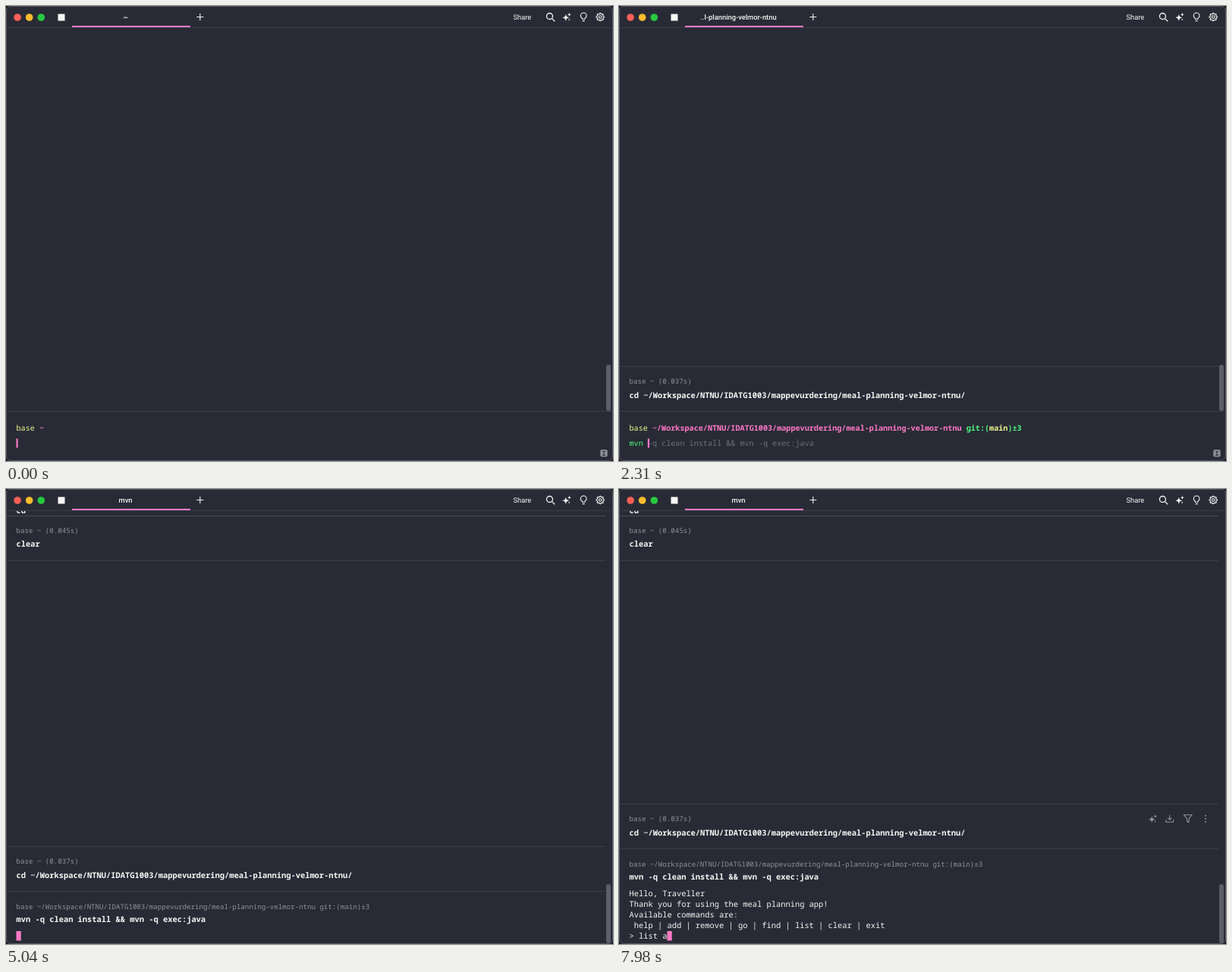
These frames come from a looping animation (800 px wide and 600 px high, 8 s). An HTML page with a canvas:

```html
<!DOCTYPE html>
<html lang="en">
<head>
<meta charset="utf-8">
<title>Terminal session</title>
<style>
  html, body { margin: 0; width: 100%; height: 100%; overflow: hidden; background: #282a36; }
  canvas { display: block; }
</style>
</head>
<body>
<canvas id="stage" width="800" height="600"></canvas>
<script>
const ctx = document.getElementById('stage').getContext('2d');
const LOOP = 8000;
const BG = '#282b36', FG = '#f8f8f4', GREY = '#90929a', DIM = '#6f717b', LINE = '#3d404b';
const PINK = '#ff79c6', YELLOW = '#f1fa8c', GREEN = '#50fa7b', BLUE = '#6fa8fa';
const BLOCK = 10.4, INPUT = 10.14, META = 9.13, LEFT = 13.5;
const FOLDER = '~/Workspace/NTNU/IDATG1003/mappevurdering/meal-planning-velmor-ntnu';
const CD = `cd ${FOLDER}/`;
const MVN = 'mvn -q clean install && mvn -q exec:java';
const OUTPUT = [
  'Hello, Traveller',
  'Thank you for using the meal planning app!',
  'Available commands are:',
  ' help | add | remove | go | find | list | clear | exit'
];

// Each entry is [start time, text typed so far].
const CD_TYPING = [[0, ''], [70, 'c'], [140, 'cd'], [350, 'cd '], [840, CD]];
const MVN_TYPING = [[0, ''], [1820, 'm'], [1960, 'mv'], [2100, 'mvn'], [2310, 'mvn '], [2730, MVN]];
const APP_TYPING = [[0, ''], [7420, 'l'], [7490, 'li'], [7560, 'lis'], [7700, 'list'], [7840, 'list '], [7980, 'list a']];
const at = (steps, t) => steps.filter(s => s[0] <= t).pop()[1];

function rect(x, y, w, h, color) {
  ctx.fillStyle = color;
  ctx.fillRect(x, y, w, h);
}

function box(x, y, w, h, r, color) {
  ctx.fillStyle = color;
  ctx.beginPath();
  ctx.roundRect(x, y, w, h, r);
  ctx.fill();
}

function disc(x, y, r, color) {
  ctx.fillStyle = color;
  ctx.beginPath();
  ctx.arc(x, y, r, 0, 7);
  ctx.fill();
}

function stroke(d, color, width = 1.2) {
  ctx.strokeStyle = color;
  ctx.lineWidth = width;
  ctx.stroke(new Path2D(d));
}

// Terminal text sits on a fixed cell grid; parts are [text, color, weight].
function mono(y, size, ...parts) {
  const cell = size * 0.6;
  let x = LEFT;
  ctx.textAlign = 'left';
  for (const [text, color, weight = 400] of parts) {
    ctx.font = `${weight} ${size}px "Noto Sans Mono", monospace`;
    ctx.fillStyle = color;
    for (const ch of text) {
      ctx.fillText(ch, x, y);
      x += cell;
    }
  }
  return x;
}

function label(text, x, weight, align) {
  ctx.font = `${weight} 9.35px Roboto, sans-serif`;
  ctx.fillStyle = FG;
  ctx.textAlign = align;
  ctx.fillText(text, x, 18);
}

function star(x, y, r, color) {
  ctx.fillStyle = color;
  ctx.beginPath();
  for (let i = 0; i < 8; i++) {
    const a = i * Math.PI / 4, d = i % 2 ? r * 0.38 : r;
    ctx.lineTo(x + d * Math.cos(a), y + d * Math.sin(a));
  }
  ctx.fill();
}

function sparkles(x, y, color) {
  star(x - 1.2, y + 1, 4.4, color);
  star(x + 3.4, y - 3, 2.5, color);
  star(x + 3.2, y + 3.6, 1.5, color);
}

function gear(x, y) {
  ctx.beginPath();
  for (let i = 0; i < 48; i++) {
    const a = i * Math.PI / 24, r = 4.6 + 0.6 * Math.tanh(3 * Math.cos(8 * a));
    ctx.lineTo(x + r * Math.cos(a), y + r * Math.sin(a));
  }
  ctx.closePath();
  ctx.strokeStyle = FG;
  ctx.lineWidth = 1.1;
  ctx.stroke();
  ctx.beginPath();
  ctx.arc(x, y, 1.8, 0, 7);
  ctx.stroke();
}

function header(title) {
  rect(0, 0, 800, 28, BG);
  rect(1, 28, 798, 1, '#3b3e49');
  ['#ff5f57', '#febc2e', '#28c840'].forEach((c, i) => disc(15.1 + 15.6 * i, 15, 4.8, c));
  rect(68.5, 10.5, 9, 9, FG);
  rect(87, 26, 156, 2, PINK);
  label(title, 157.5, 500, 'center');
  label('Share', 668.5, 400, 'left');
  stroke('M251.3 14.5h9M255.8 10v9', FG, 1.1);
  stroke('M720.5 13.5a4 4 0 1 1-8 0a4 4 0 1 1 8 0M719.4 16.4l3.8 3.8', FG, 1.3);
  sparkles(739, 14.3, FG);
  stroke('M759.6 17.2c0-1.6-2.3-2-2.3-4.3a3.9 3.9 0 0 1 7.8 0c0 2.3-2.3 2.7-2.3 4.3zM759.7 19.6h3', FG, 1.1);
  gear(783.2, 14.5);
}

const divider = (y, w = 790) => rect(1, y, w - 1, 1, LINE);
const scrollbar = (y, h) => box(791, y, 6, h, 3, '#5c5e68');

function cdBlock(y, link) {
  divider(y);
  mono(y + 23.3, META, ['base ~ (0.037s)', GREY]);
  mono(y + 41.7, BLOCK, ['cd ', FG, 700], [CD.slice(3), link ? BLUE : FG, 700]);
  if (link) rect(32.2, y + 44, 424.5, 1, BLUE);
}

function blockTools(y) {
  sparkles(703.5, y, GREY);
  stroke(`M725.8 ${y - 5}v6.5m-2.6-2.5l2.6 2.6l2.6-2.6M721 ${y + 1}v3.5h9.6v-3.5`, GREY, 1.1);
  stroke(`M744.6 ${y - 5}h10.4l-4 5.2v4.6l-2.4-1.4v-3.2z`, GREY, 1.1);
  [-4, 0, 4].forEach(d => disc(773, y + d, 1, GREY));
}

function inputLine(typed, full, name) {
  const known = typed.startsWith(name);
  const cursor = mono(580, INPUT, [known ? name : typed, known ? GREEN : FG], [known ? typed.slice(name.length) : '', FG]);
  if (typed) mono(580, INPUT, [' '.repeat(typed.length), DIM], [full.slice(typed.length), DIM]);
  rect(cursor, 570.5, 2.2, 12, PINK);
}

function promptScreen(t) {
  const moved = t >= 1260;
  if (moved) cdBlock(475, false);
  divider(534, 799);
  scrollbar(473, 61);
  if (moved) {
    mono(559.7, INPUT, ['base ', YELLOW], [FOLDER, PINK, 700], [' git:(', GREEN, 700],
      ['main', YELLOW, 700], [')' + (t >= 1540 ? '±3' : ''), GREEN, 700]);
    inputLine(at(MVN_TYPING, t), MVN, 'mvn');
  } else {
    mono(559.7, INPUT, ['base ', YELLOW], ['~', PINK, 700]);
    inputLine(at(CD_TYPING, t), CD, 'cd');
  }
  box(783.3, 585, 9.4, 9.6, 2, '#8d8f96');
  stroke('M786 587.3h4M786 592.3h4M788 587.3v5', BG, 1);
  header(moved ? '..l-planning-velmor-ntnu' : '~');
}

function runScreen(t) {
  const ready = t >= 6580;
  const top = ready ? 415 : 471;
  mono(32, BLOCK, ['cd', FG, 700]);
  rect(1, 35, 789, 1, '#4a4d57');
  mono(58.3, META, ['base ~ (0.045s)', GREY]);
  mono(76, BLOCK, ['clear', FG, 700]);
  divider(94);
  cdBlock(top, ready && t < 6860);
  divider(top + 59);
  mono(top + 82.6, META, [`base ${FOLDER} git:(main)±3`, GREY]);
  mono(top + 100.4, BLOCK, [MVN, FG, 700]);
  let cursor = LEFT;
  if (ready) {
    blockTools(434.7);
    OUTPUT.forEach((line, i) => mono(536.7 + 14 * i, BLOCK, [line, FG, 500]));
    cursor = mono(592.7, BLOCK, ['> ' + at(APP_TYPING, t), FG, 500]);
  }
  rect(cursor, 583, 6.3, 12.5, PINK);
  scrollbar(521, 78);
  header('mvn');
}

function draw() {
  const t = performance.now() % LOOP;
  rect(0, 0, 800, 600, '#1b1c23');
  ctx.save();
  ctx.beginPath();
  ctx.roundRect(0, 0, 800, 600, 6);
  ctx.clip();
  rect(0, 0, 800, 600, BG);
  if (t < 3010) promptScreen(t);
  else runScreen(t);
  ctx.restore();
  ctx.strokeStyle = '#555861';
  ctx.lineWidth = 1;
  ctx.beginPath();
  ctx.roundRect(0.5, 0.5, 799, 599, 6);
  ctx.stroke();
  requestAnimationFrame(draw);
}

ctx.textRendering = 'geometricPrecision';
draw();
</script>
</body>
</html>
```
